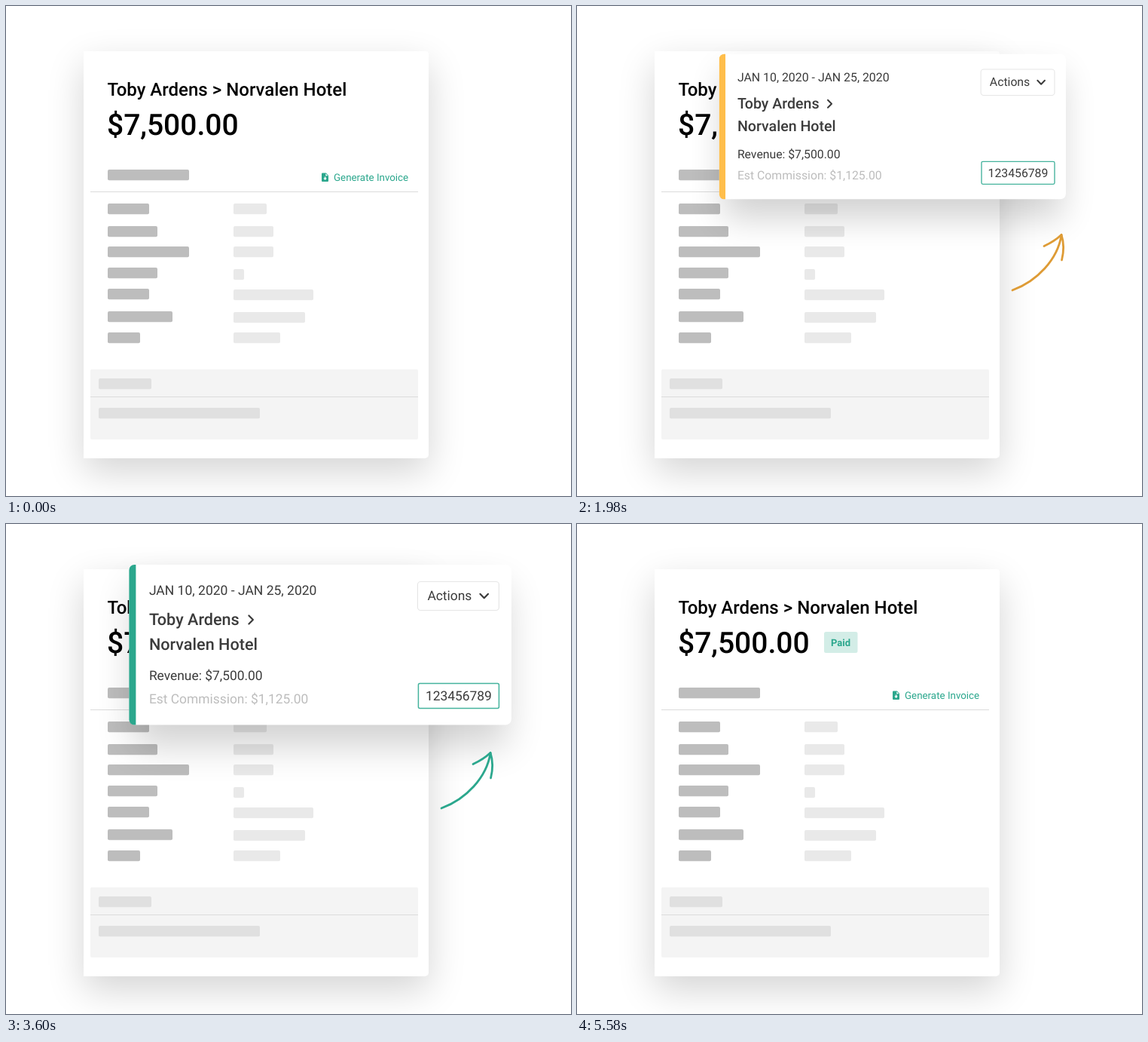
Recreate the animation shown at these times as an HTML page. Size 750x650 px, loop 7230 ms.

```html
<!DOCTYPE html>
<html lang="en">
<head>
<meta charset="utf-8">
<title>Invoice status</title>
<style>
  html, body { margin: 0; width: 100%; height: 100%; overflow: hidden; background: #fff; }
  svg { display: block; width: 750px; height: 650px; font-family: Roboto, sans-serif; text-rendering: geometricPrecision; }
  .m { font-weight: 500; }
  .shade { fill: #000; filter: blur(25px); }
  .line { fill: none; stroke-linecap: round; stroke-linejoin: round; }
  #card { --accent: #ffbe4b; }
  #card text { fill: #3b3b3b; font-size: 17.4px; }
  #card .m { font-size: 21.6px; }
  #card .dim { fill: #bdbdbd; }
</style>
</head>
<body>
<svg viewBox="0 0 750 650">
  <g id="paper">
    <rect class="shade" x="103" y="78" width="458" height="540" opacity=".17"/>
    <path fill="#fff" d="M103 60H557a4 4 0 0 1 4 4V595a5 5 0 0 1-5 5H103z"/>
    <text class="m" x="134.5" y="119" font-size="24">Toby Ardens &gt; Norvalen Hotel</text>
    <text class="m" x="134" y="171" font-size="39">$7,500.00</text>
    <g fill="#2ba78d">
      <path d="M420 221.500h4.800l3.200 3.200v7.300a1 1 0 0 1-1 1h-7a1 1 0 0 1-1-1v-9.500a1 1 0 0 1 1-1z"/>
      <path fill="#fff" d="M424.300 222.300v3h3zM422.800 226.500h1.600v2h1.500l-2.300 2.500-2.300-2.500h1.500z"/>
      <text x="435" y="232" font-size="13.35">Generate Invoice</text>
    </g>
    <rect x="112" y="482" width="435" height="93" rx="2" fill="#f4f4f4"/>
    <path d="M112 246.500H547M112 518.500H547" stroke="#dcdcdc"/>
    <g id="bars"></g>
    <g id="paid">
      <rect x="328" y="143" width="44.500" height="28" rx="2.500" fill="#d3ede7"/>
      <text x="350" y="161.500" font-size="13" font-weight="700" text-anchor="middle" fill="#2ba78d">Paid</text>
    </g>
  </g>

  <g id="card">
    <rect class="shade" x="170" y="82" width="495" height="212" opacity=".18"/>
    <rect x="164" y="54" width="507.500" height="212.500" rx="8" fill="#fff"/>
    <path d="M173 54h-2a7 7 0 0 0-7 7v198.500a7 7 0 0 0 7 7h2z" fill="var(--accent)"/>
    <text x="190.500" y="94" style="font-size:17.5px">JAN 10, 2020 - JAN 25, 2020</text>
    <text class="m" x="190.500" y="134">Toby Ardens</text>
    <path class="line" d="M323 121.500l5.500 5.500-5.500 5.500" stroke="#3b3b3b" stroke-width="2.200"/>
    <text class="m" x="190.500" y="166.500">Norvalen Hotel</text>
    <text x="190.500" y="207">Revenue: $7,500.00</text>
    <text class="dim" x="190.500" y="237.500">Est Commission: $1,125.00</text>
    <rect x="547" y="76.500" width="108" height="38" rx="4" fill="#fff" stroke="#e6e6e6" stroke-width="1.200"/>
    <text x="560" y="100.500">Actions</text>
    <path class="line" d="M630 92.800l5.300 5.400 5.300-5.400" stroke="#3b3b3b" stroke-width="2.200"/>
    <rect x="548" y="211.500" width="107" height="33" rx="2" fill="#fff" stroke="#45b39d" stroke-width="1.500"/>
    <text x="557.500" y="234">123456789</text>
  </g>

  <g id="arrow" class="line" stroke-width="2.800">
    <path pathLength="1" d="M578 377C611 365 638 336 643 304"/>
    <path pathLength="1" d="M643 303.500Q634 312 620 318.500"/>
    <path pathLength="1" d="M643 303.500Q648 319 643.500 337"/>
  </g>
</svg>
<script>
const LOOP = 7230, STEP = 30;
const $ = id => document.getElementById(id);
const card = $('card'), arrow = $('arrow'), paid = $('paid');
const [shaft, ...barbs] = arrow.children;

// Placeholder bars: colour, left edge, then [top, width] pairs
const bars = [
  ['#bdbdbd', 135, [[217, 108], [262, 55], [292, 66], [319, 108], [347, 66], [375, 55], [405, 86], [433, 43]]],
  ['#e9e9e9', 302, [[262, 44], [292, 53], [319, 53], [349, 14], [376, 106], [406, 95], [433, 62]]],
  ['#e0e0e0', 123, [[494, 70], [533, 214]]]
];
$('bars').innerHTML = bars.map(([fill, x, rows]) => rows.map(([y, w]) =>
  `<rect x="${x}" y="${y}" width="${w}" height="14.300" rx="2" fill="${fill}"/>`).join('')).join('');

const ramp = (t, a, b) => Math.min(1, Math.max(0, (t - a) / (b - a)));
const smooth = p => p * p * (3 - 2 * p);
const mix = (a, b, k) => `rgb(${a.map((v, i) => Math.round(v + (b[i] - v) * k))})`;

const GREEN = [43, 167, 141], YELLOW = [255, 190, 75], OCHRE = [222, 155, 53];

function draw(path, p) {
  path.style.visibility = p > 0 ? 'visible' : 'hidden';
  path.style.strokeDasharray = p < 1 ? `${p} 2` : 'none';
}

function render(time) {
  const t = Math.floor(time % LOOP / STEP) * STEP;
  const fade = 1 - ramp(t, 5250, 5580);
  const green = ramp(t, 3450, 3600);

  draw(shaft, smooth(ramp(t, 1200, 1680)));
  barbs.forEach(b => draw(b, smooth(ramp(t, 1650, 1890))));
  arrow.style.stroke = mix(OCHRE, GREEN, green);
  arrow.style.opacity = fade;

  const scale = 1 - 0.232 * Math.exp((1890 - t) / 99);
  const shown = t >= 1890 && fade > 0;
  card.style.display = shown ? '' : 'none';
  if (shown) {
    card.style.opacity = ramp(t, 1830, 1950) * fade;
    card.style.setProperty('--accent', mix(YELLOW, GREEN, green));
    card.setAttribute('transform',
      `translate(${430 - 0.6 * green} 157) scale(${scale}) translate(-430 -157)`);
  }
  paid.style.display = t >= 5190 ? '' : 'none';
}

function tick() {
  render(performance.now());
  requestAnimationFrame(tick);
}
tick();
</script>
</body>
</html>
```
